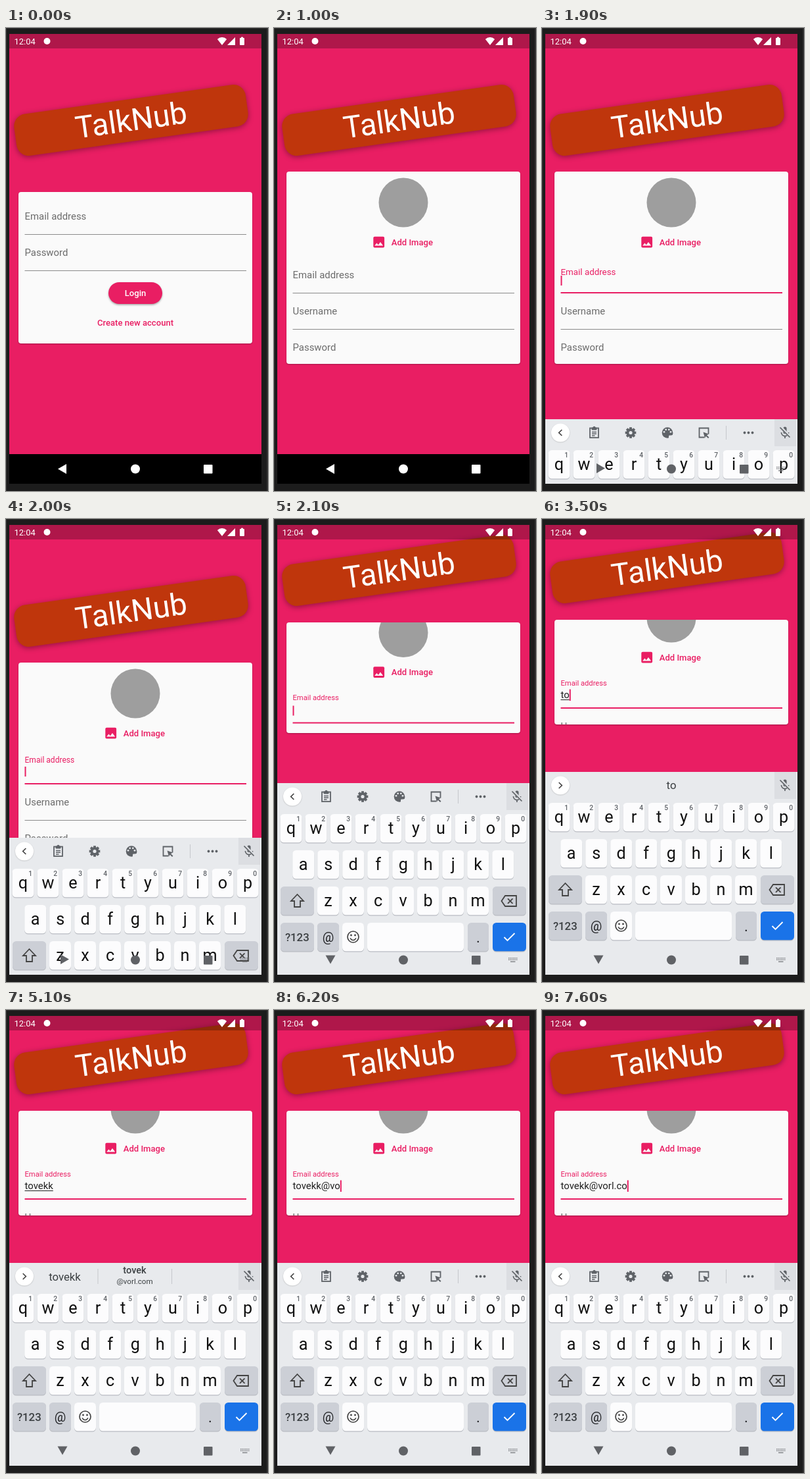
An HTML page with a canvas that plays this animation: 399 by 703 pixels, repeating every 8 s.

```html
<!DOCTYPE html>
<html lang="en">
<head>
<meta charset="utf-8">
<title>Sign up</title>
<style>
html, body { margin: 0; width: 100%; height: 100%; overflow: hidden; background: #1c1c1c; }
canvas { display: block; width: 399px; height: 703px; }
</style>
</head>
<body>
<canvas id="stage"></canvas>
<script>
const W = 399, H = 703, LOOP = 8000;
const PINK = '#e91e63', GREY = '#5f6368', LABEL = '#6c6c6c', CARD = '#fafafa', KEYS = '#e8eaed', DIM = '#cccfd6';
const EMAIL = 'tovekk@vorl.co';
const KEY_TIMES = [3200, 3400, 4000, 4100, 4300, 4600, 5500, 6100, 6200, 6400, 6500, 7300, 7400, 7600];
const CARET_OFF = [[2700, 3200], [3900, 4000], [5100, 5500], [5900, 6100], [7000, 7300]];
// start, keyboard drop, logo shift, card top, card bottom, scroll, label float
const POSES = [
  [1000, 320, 0, 218, 510, 0, 0],
  [1800, 320, 0, 218, 510, 0, 0.1],
  [1900, 210, 0, 218, 510, 0, 0.42],
  [2000, 100, 0, 218, 510, 0, 0.77],
  [2100, 17, -62, 157, 325, 92.5, 1],
  [2200, 4, -65, 154, 315, 110, 1],
  [2300, 0, -66, 153, 312, 115, 1]
];

const canvas = document.getElementById('stage');
const c = canvas.getContext('2d');
const dpr = window.devicePixelRatio || 1;
canvas.width = W * dpr;
canvas.height = H * dpr;

function rect(x, y, w, h, color) {
  c.fillStyle = color;
  c.fillRect(x, y, w, h);
}
function round(x, y, w, h, r, color) {
  c.beginPath();
  c.roundRect(x, y, w, h, r);
  c.fillStyle = color;
  c.fill();
}
function disc(x, y, r, color) {
  c.beginPath();
  c.arc(x, y, r, 0, 7);
  c.fillStyle = color;
  c.fill();
}
function trace(pts, close) {
  c.beginPath();
  for (let i = 0; i < pts.length; i += 2) c.lineTo(pts[i], pts[i + 1]);
  if (close) c.closePath();
}
function poly(pts, color) {
  trace(pts, true);
  c.fillStyle = color;
  c.fill();
}
function line(pts, color, width = 1.7, close = false) {
  trace(pts, close);
  c.strokeStyle = color;
  c.lineWidth = width;
  c.stroke();
}
function ring(x, y, r, color, width, from = 0, to = 7) {
  c.beginPath();
  c.arc(x, y, r, from, to);
  c.strokeStyle = color;
  c.lineWidth = width;
  c.stroke();
}
function text(s, x, y, size, color, weight = 400, align = 'left') {
  c.font = `${weight} ${size}px Roboto, sans-serif`;
  c.textAlign = align;
  c.fillStyle = color;
  c.fillText(s, x, y);
  return c.measureText(s).width;
}
function at(x, y, draw) {
  c.save();
  c.translate(x, y);
  draw();
  c.restore();
}
function shadow(color, blur, dy) {
  c.shadowColor = color;
  c.shadowBlur = blur * dpr;
  c.shadowOffsetY = dy * dpr;
}

function bezel() {
  rect(0, 0, W, H, '#1c1c1c');
  rect(0, 0, W, 1, '#303030');
  rect(0, 0, 1, H, '#303030');
  rect(397, 0, 2, H, '#303030');
}

function logo(dy) {
  at(190.5, 140 + dy, () => {
    c.rotate(-8 * Math.PI / 180);
    c.save();
    shadow('rgba(0,0,0,.36)', 8, 2);
    round(-178, -32, 356, 64, 18.7, '#bf360c');
    c.restore();
    text('TalkNub', 0, 16, 46.7, '#fff', 400, 'center');
  });
}

function statusBar() {
  rect(5, 9, 384, 22, 'rgba(0,0,0,.25)');
  text('12:04', 12.5, 25, 13, '#fff');
  disc(62.5, 20, 5, '#fff');
  c.beginPath();
  c.moveTo(329, 26);
  c.arc(329, 24.5, 10.4, -2.33, -0.81);
  c.closePath();
  c.fillStyle = '#fff';
  c.fill();
  poly([337, 26, 349, 14, 349, 26], '#fff');
  round(356, 15, 7, 11, 1, '#fff');
  rect(358, 13.7, 3, 2, '#fff');
}

function navIcons(color, turn, x, y) {
  at(x, y, () => {
    c.rotate(turn);
    poly([-7, 0, 6, -7.5, 6, 7.5], color);
  });
  disc(197, 669.5, 7, color);
  round(301, 663, 13.5, 13.5, 1, color);
}

function cardBox(top, bottom, draw) {
  c.save();
  shadow('rgba(0,0,0,.3)', 2, 1);
  round(19, top, 356, bottom - top, 4, CARD);
  c.restore();
  c.save();
  c.beginPath();
  c.roundRect(19, top, 356, bottom - top, 4);
  c.clip();
  draw();
  c.restore();
}

function field(name, base) {
  text(name, 28.5, base, 14.93, LABEL);
  rect(28.5, base + 22, 337.5, 1, '#8b8b8b');
}

function login(pressed) {
  cardBox(249, 479, () => {
    field('Email address', 291);
    field('Password', 346);
    c.save();
    shadow('rgba(0,0,0,.35)', 3, 1.5);
    round(156, 386, 82, 33, 16.5, PINK);
    c.restore();
    text('Login', 197, 407, 13.07, '#fff', 500, 'center');
    if (pressed) round(131, 431, 132, 33, 16.5, 'rgba(233,30,99,.12)');
    text('Create new account', 197, 452, 13.07, PINK, 500, 'center');
  });
}

function signup(t, pose, typed) {
  const [, , , top, bottom, scroll, lift] = pose;
  cardBox(top, bottom, () => {
    c.translate(0, -scroll);
    disc(197, 265, 37.5, '#9e9e9e');
    round(151.3, 316.7, 16.8, 16.8, 2, PINK);
    poly([153.2, 330.5, 156.4, 326.4, 158.8, 329.2, 162, 325, 166.2, 330.5], CARD);
    text('Add Image', 178.7, 329.7, 13.07, PINK, 500);
    field('Username', 435);
    field('Password', 490);
    if (!lift) return field('Email address', 380);

    text('Email address', 28.5, 380 - 12.5 * lift, 14.93 - 3.73 * lift, PINK);
    rect(28.5, 401, 337.5, 2, PINK);
    const w = text(typed, 28.5, 387.3, 14.93, '#212121');
    if (typed && typed.length < 7) rect(28.5, 389, w, 1, '#212121');
    if (!CARET_OFF.some(([a, b]) => t >= a && t < b)) {
      const y = typed ? 373.5 : 376;
      rect(28.5 + w, y, 2, 391 - y, PINK);
    }
  });
}

function gear() {
  for (let i = 0; i < 8; i++) {
    c.save();
    c.rotate(i * Math.PI / 4);
    rect(-1.9, -8.3, 3.8, 4, GREY);
    c.restore();
  }
  ring(0, 0, 4.5, GREY, 3.8);
}

function clipboard() {
  c.strokeStyle = GREY;
  c.lineWidth = 1.8;
  c.strokeRect(-6.5, -6.5, 13, 14.5);
  round(-4, -7.5, 8, 4, 1, GREY);
  disc(0, -7.3, 2, GREY);
  line([-3.5, -0.5, 3.5, -0.5], GREY, 1.5);
  line([-3.5, 2.2, 3.5, 2.2], GREY, 1.5);
  line([-3.5, 5, 1, 5], GREY, 1.5);
}

function palette() {
  disc(0, 0, 8.3, GREY);
  round(2, 3.2, 7, 7, 2.5, KEYS);
  c.beginPath();
  c.ellipse(4.3, 1.2, 4, 2.8, 0, 0, 7);
  c.fillStyle = GREY;
  c.fill();
  for (const [x, y] of [[-5, -1.2], [-2.3, -4.7], [2.3, -4.7], [5, -1.2]]) disc(x, y, 1.4, KEYS);
}

function sticker() {
  line([1, 7, -7, 7, -7, -7, 7, -7, 7, 2], GREY, 1.8);
  poly([-1, -1, 7.5, 2, 4.5, 3.7, 8, 7, 6.5, 8.5, 3.2, 5.2, 1.5, 8], GREY);
}

function micOff() {
  round(-2.6, -8.5, 5.2, 10.5, 2.6, GREY);
  ring(0, 0, 5.6, GREY, 1.6, 0, Math.PI);
  line([0, 5.5, 0, 9], GREY);
  line([-6.5, -8.5, 8, 7], '#dcdee2', 4);
  line([-7.5, -7.5, 7.5, 7.5], GREY, 1.7);
}

function toolbar(hint) {
  c.save();
  shadow('rgba(0,0,0,.2)', 2, 0.7);
  disc(28, 404.5, 14, '#fff');
  c.restore();
  rect(354, 384, 33, 41, '#dcdee2');
  at(370, 404, micOff);
  const words = hint && hint.length < 7;
  const d = words ? 2.3 : -2.3;
  line([28 - d, 400, 28 + d, 404.5, 28 - d, 409], '#444', 1.7);
  if (!words) {
    at(79.5, 404, clipboard);
    at(135, 404.5, gear);
    at(191, 404.5, palette);
    at(246.5, 404.5, sticker);
    rect(280, 394, 1, 21, '#c6c8cc');
    for (const x of [308.5, 314.5, 320.5]) disc(x, 404.5, 1.9, GREY);
  } else if (hint.length < 6) {
    text(hint, 197, 410, 16.8, '#3c4043', 400, 'center');
  } else {
    text(hint, 89.5, 411, 16.8, '#3c4043', 400, 'center');
    text(hint.slice(0, 5), 196, 400, 14.6, '#3c4043', 500, 'center');
    text('@vorl.com', 196, 416, 11.6, '#3c4043', 400, 'center');
    rect(139.5, 393, 1, 23, '#c6c8cc');
    rect(252, 393, 1, 23, '#c6c8cc');
  }
}

function key(x, y, w, color = '#fcfcfd') {
  round(x, y + 1, w, 43.5, 5.5, '#b9bcc2');
  round(x, y, w, 43.3, 5.5, color);
}

function letters(row, x, y, numbered) {
  [...row].forEach((ch, i) => {
    const mid = x + i * 38;
    key(mid - 16.5, y, 33);
    text(ch, mid, y + 30, 25.2, '#111', 400, 'center');
    if (numbered) text((i + 1) % 10, mid + 11.3, y + 11.3, 10.3, GREY, 500, 'center');
  });
}

function keyboard(drop, hint) {
  c.save();
  c.translate(0, drop);
  rect(5, 384, 384, 310, KEYS);
  toolbar(hint);
  letters('qwertyuiop', 26, 431, true);
  letters('asdfghjkl', 44.7, 486);
  letters('zxcvbnm', 82.5, 541);

  key(10, 541, 51, DIM);
  line([35.5, 553, 45, 563, 40, 563, 40, 572, 31, 572, 31, 563, 26, 563], '#444', 1.8, true);
  key(333, 541, 51, DIM);
  line([352, 555, 369, 555, 369, 571, 352, 571, 346.5, 563], '#444', 1.8, true);
  line([356, 559.3, 363.5, 566.8], '#444', 1.8);
  line([363.5, 559.3, 356, 566.8], '#444', 1.8);

  key(10, 596, 51, DIM);
  text('?123', 35.3, 624, 16.8, '#3c4043', 500, 'center');
  key(66, 596, 33, DIM);
  text('@', 82.5, 625, 19.5, '#202124', 400, 'center');
  key(104, 596, 33);
  ring(120.5, 617.5, 8.5, '#444', 1.7);
  disc(117.5, 615, 1.4, '#444');
  disc(123.5, 615, 1.4, '#444');
  ring(120.5, 618, 4.5, '#444', 1.5, 0.3, Math.PI - 0.3);
  key(142, 596, 147);
  key(295, 596, 32, DIM);
  text('.', 311, 626, 22, '#202124', 400, 'center');
  key(333, 596, 51, '#1a73e8');
  line([350.5, 618, 355.5, 623, 366.5, 612], '#fff', 1.9);
  c.restore();

  const early = drop > 50;
  navIcons('#606266', early ? Math.PI : -Math.PI / 2, early ? 89 : 86, 668.5);
  for (let i = 0; i < 6; i++) {
    for (let j = 0; j < 2; j++) rect(357 + i * 2.4, 666 + j * 2.5, 1.4, 1.4, '#77797d');
  }
  rect(360, 671.5, 7.5, 1.3, '#77797d');
}

function scene(t) {
  const pose = POSES.filter(p => p[0] <= t).pop();
  const upTo = ms => EMAIL.slice(0, KEY_TIMES.filter(k => k <= ms).length);
  c.setTransform(dpr, 0, 0, dpr, 0, 0);
  bezel();
  c.save();
  c.beginPath();
  c.rect(5, 9, 384, 683);
  c.clip();
  rect(5, 9, 384, 683, PINK);
  logo(pose ? pose[2] : 0);
  statusBar();
  if (pose) signup(t, pose, upTo(t));
  else login(t >= 900);
  rect(5, 647, 384, 45, '#000');
  // suggestions trail the typing by one step
  if (pose && pose[1] < 300) keyboard(pose[1], upTo(t - 100));
  else navIcons('#fff', 0, 86, 669.5);
  c.restore();
}

const start = performance.now();
function tick() {
  const t = (performance.now() - start) % LOOP;
  scene(Math.floor(t / 100) * 100);
  requestAnimationFrame(tick);
}
tick();
</script>
</body>
</html>
```
